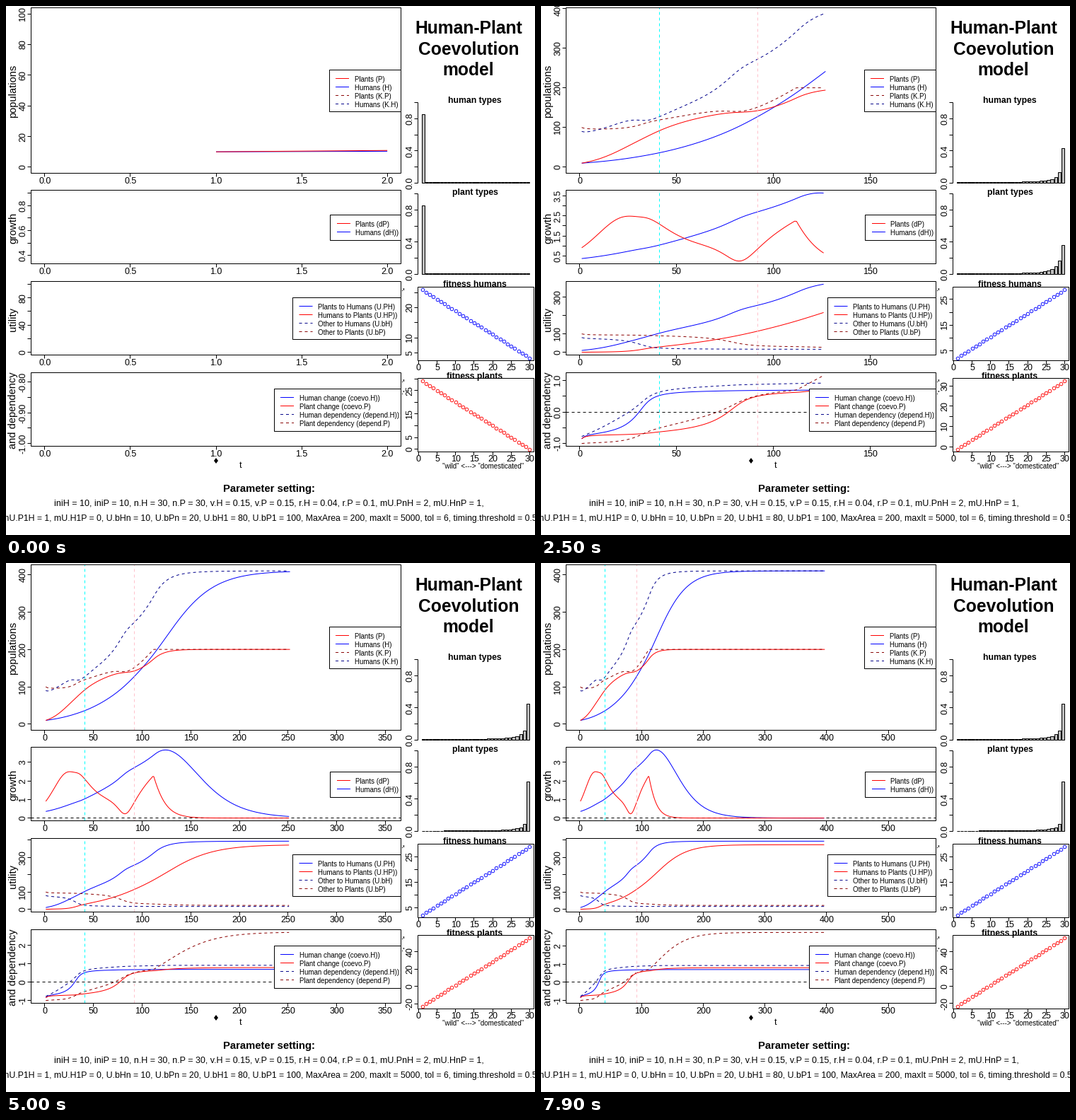
Animation of 748 by 748 pixels, one loop 8000 ms. Source, as a matplotlib script:

```python
import numpy as np
import matplotlib.pyplot as plt
from matplotlib.animation import FuncAnimation
from matplotlib.patches import Rectangle

SIZE, DPI = 748, 64
PX = 72 / DPI  # points per pixel
FRAMES = 80
N_TYPES = 30
TYPE = np.arange(1, N_TYPES + 1)
RAMP = np.linspace(0, 1, N_TYPES)
PAD = 0.04
DARK_RED, DARK_BLUE = "#8b0000", "#00008b"

plt.rcParams["font.family"] = "Liberation Sans"
plt.rcParams["path.snap"] = False  # straight rules are aligned by crisp()


# ---- model ----
def fitness(share):
    return (N_TYPES - TYPE) * (1 - share) + TYPE * share


def simulate(steps):
    """Coevolution of humans and plants, one record per step."""
    H = P = 10.0
    mix_h = np.eye(N_TYPES)[0]
    mix_p = mix_h.copy()
    log = []
    for _ in range(steps):
        u_ph, u_hp = P * (1 + RAMP @ mix_p), H * (RAMP @ mix_h)
        u_bh, u_bp = 80 - 70 * RAMP @ mix_h, 100 - 80 * RAMP @ mix_p
        k_h, k_p = u_ph + u_bh, min(u_hp + u_bp, 200)
        var_h, var_p = (0.85 * m + 0.15 / N_TYPES for m in (mix_h, mix_p))
        fit_h, fit_p = fitness(u_ph / k_h), fitness(u_hp / k_p)
        d_h, d_p = 0.04 * H * (1 - H / k_h), 0.1 * P * (1 - P / k_p)
        log.append(dict(
            P=P, H=H, KP=k_p, KH=k_h, dP=d_p, dH=d_h,
            UPH=u_ph, UHP=u_hp, UbH=u_bh, UbP=u_bp,
            cH=var_h @ (2 * RAMP - 1), cP=var_p @ (2 * RAMP - 1),
            depH=2 * u_ph / k_h - 1, depP=2 * u_hp / k_p - 1,
            varH=var_h, varP=var_p, fitH=fit_h, fitP=fit_p))
        mix_h = var_h * fit_h / (var_h @ fit_h)
        mix_p = var_p * fit_p / (var_p @ fit_p)
        H, P = H + d_h, P + d_p
    return {key: np.array([row[key] for row in log]) for key in log[0]}


DATA = simulate(5 * FRAMES + 2)

# ---- stage in pixel coordinates ----
fig = plt.figure(figsize=(SIZE / DPI, SIZE / DPI), dpi=DPI, facecolor="white")
ax = fig.add_axes([0, 0, 1, 1])
ax.set_xlim(0, SIZE)
ax.set_ylim(SIZE, 0)
ax.axis("off")
moving = []


def crisp(v):
    """Centre of the pixel that holds v."""
    return np.floor(v) + 0.5


def line(x, y, color="black", dash=False, z=3):
    style = {"dashes": (4, 4)} if dash else {}
    return ax.plot(x, y, color=color, lw=PX, zorder=z, solid_capstyle="butt", **style)[0]


def rule(x, y, *args, **kw):
    return line(crisp(x), crisp(y), *args, **kw)


def text(x, y, s, size=12.5, ha="center", **kw):
    return ax.text(x, y, s, fontsize=size * PX, ha=ha, va="baseline",
                   rotation_mode="anchor", zorder=7, **kw)


def frame_box(x0, y0, x1, y1, face="none", z=4):
    ax.add_patch(Rectangle((x0, y0), x1 - x0, y1 - y0, facecolor=face,
                           edgecolor="black", lw=PX, zorder=z))


def pretty(lo, hi, n=5):
    """Round tick positions inside lo..hi, and their labels."""
    cell = (hi - lo) / n
    base = 10.0 ** np.floor(np.log10(cell))
    unit = base
    for mult, bias in ((2, 0.8), (5, 1.7), (10, 0.8)):
        if mult * base - cell < bias * (cell - unit):
            unit = mult * base
        else:
            break
    first, last = np.ceil(lo / unit - 1e-7), np.floor(hi / unit + 1e-7)
    places = max(0, -int(np.floor(np.log10(unit) + 1e-9)))
    steps = np.arange(int(first), int(last) + 1)
    return [(i * unit, f"{i * unit:.{places}f}") for i in steps]


def label_width(s):
    return sum({".": 3, "-": 4}.get(c, 7) for c in s)


class Scale:
    """Maps a padded data range to pixels."""

    def __init__(self, lo, hi, a, b):
        pad = PAD * (hi - lo)
        self.lo, self.hi, self.a, self.b = lo - pad, hi + pad, a, b

    def __call__(self, v):
        return self.a + (np.asarray(v) - self.lo) / (self.hi - self.lo) * (self.b - self.a)

    def ticks(self):
        return [(float(self(v)), s) for v, s in pretty(self.lo, self.hi)]


def y_axis(ticks, x):
    out, end = [], -1e9
    for y, s in ticks:
        out.append(rule([x - 5.5, x], [y, y]))
        half = label_width(s) / 2
        if -y - half - end >= 9.35:
            out.append(text(x - 8, y, s, rotation=90))
            end = -y + half
    return out


def x_axis(ticks, y, base):
    out = []
    for x, s in ticks:
        out += [rule([x, x], [y, y + 5]), text(x, base, s)]
    return out


# ---- left panels: top, bottom, lower limit, zero line, curves ----
LEFT, RIGHT = 35.5, 558.5
PANELS = [
    (2.5, 236.5, 0, False, [("H", "blue", 0), ("P", "red", 0),
                            ("KP", DARK_RED, 1), ("KH", DARK_BLUE, 1)]),
    (260.5, 364.5, None, True, [("dH", "blue", 0), ("dP", "red", 0)]),
    (389.5, 493.5, 0, False, [("UPH", "blue", 0), ("UHP", "red", 0),
                              ("UbH", DARK_BLUE, 1), ("UbP", DARK_RED, 1)]),
    (518.5, 622.5, None, True, [("cH", "blue", 0), ("cP", "red", 0),
                                ("depH", DARK_BLUE, 1), ("depP", DARK_RED, 1)]),
]
Y_TITLES = ["populations", "growth", "utility", "and dependency"]
MARKS = [(41, "cyan"), (92, "pink")]

# box left, top, bottom, sample x, text x, first row, entries
LEGENDS = [
    (457.5, 90.5, 149.5, 466, 493, 103, [
        ("Plants (P)", "red", 0), ("Humans (H)", "blue", 0),
        ("Plants (K.P)", DARK_RED, 1), ("Humans (K.H)", DARK_BLUE, 1)]),
    (458.5, 295.5, 331.5, 468, 494, 308, [
        ("Plants (dP)", "red", 0), ("Humans (dH))", "blue", 0)]),
    (405.5, 412.5, 471.5, 414.5, 441, 425, [
        ("Plants to Humans (U.PH)", "blue", 0), ("Humans to Plants (U.HP))", "red", 0),
        ("Other to Humans (U.bH)", DARK_BLUE, 1), ("Other to Plants (U.bP)", DARK_RED, 1)]),
    (379.5, 541.5, 601.5, 388, 415, 554, [
        ("Human change (coevo.H))", "blue", 0), ("Plant change (coevo.P)", "red", 0),
        ("Human dependency (depend.H))", DARK_BLUE, 1),
        ("Plant dependency (depend.P)", DARK_RED, 1)]),
]

# ---- right panels ----
R_LEFT, R_RIGHT = 582.5, 746.5
TYPE_X = Scale(1, N_TYPES, R_LEFT, R_RIGHT)
BARS = [("varH", 250.5), ("varP", 379.5)]
FITS = [("fitH", 397.5, 501.5, "blue"), ("fitP", 526.5, 630.5, "red")]
BAR_H = 114
BAR_UNIT = (R_RIGHT - R_LEFT) / 1.08 / 35.8
BAR_X = R_LEFT + (R_RIGHT - R_LEFT) * PAD / 1.08 + BAR_UNIT * 1.2 * np.arange(N_TYPES)


def draw_static():
    for (top, bottom, *_), title in zip(PANELS, Y_TITLES):
        frame_box(LEFT, top, RIGHT, bottom)
        text(14, (top + bottom) / 2 + 1, title, 14.6, rotation=90)
    for x, top, bottom, sx, tx, y, rows in LEGENDS:
        frame_box(x, top, RIGHT, bottom, "white", 5)
        for i, (s, color, dash) in enumerate(rows):
            row = y + 12 * i
            line([sx, sx + 19], [row - 0.5] * 2, color, dash, z=6)
            text(tx, row + 3.5, s, 9.7, "left")

    for i, s in enumerate(("Human-Plant", "Coevolution", "model")):
        text(654, 39 + 29.6 * i, s, 24.6, weight="bold")
    for y, s in ((137, "human types"), (267, "plant types"),
                 (397, "fitness humans"), (526.5, "fitness plants")):
        text(663, y, s, 12.2, weight="bold")

    for _, base in BARS:
        line([R_LEFT] * 2, [base, base - BAR_H])
        y_axis([(base - BAR_H * v / 10, f"{v / 10:.1f}") for v in range(0, 11, 2)], R_LEFT)
    for _, top, bottom, _ in FITS:
        frame_box(R_LEFT, top, R_RIGHT, bottom)
        x_axis(TYPE_X.ticks(), bottom, bottom + 13.5)

    text(332, 653, "t")
    text(675, 653.5, '"wild" <---> "domesticated"', 9.8)
    ax.plot([297], [643], "d", color="black", ms=6 * PX, mew=0)
    # stray tips of cropped axis titles
    for x, y, h in ((562.5, 399, 3), (560.5, 402, 1), (562.5, 528, 3),
                    (560.5, 531, 1), (562.5, 544, 2), (560.5, 548, 1)):
        line([x, x], [y, y + h])

    text(372.5, 687, "Parameter setting:", 14.9, weight="bold")
    text(371.5, 707, "iniH = 10, iniP = 10, n.H = 30, n.P = 30, v.H = 0.15, v.P = 0.15, "
         "r.H = 0.04, r.P = 0.1, mU.PnH = 2, mU.HnP = 1,", 12.5)
    text(372, 728, "mU.P1H = 1, mU.H1P = 0, U.bHn = 10, U.bPn = 20, U.bH1 = 80, "
         "U.bP1 = 100, MaxArea = 200, maxIt = 5000, tol = 6, timing.threshold = 0.5", 12.25)


def draw_panel(panel, now, sx):
    top, bottom, low, zero, curves = panel
    series = [DATA[key][:now + (key in "PH")] for key, *_ in curves]
    hi = max(s.max() for s in series)
    lo = min(s.min() for s in series) if low is None else low
    sy = Scale(lo, hi, bottom, top)
    out = []
    for s, (_, color, dash) in zip(series, curves):
        if len(s) > 1:
            out.append(line(sx(np.arange(1, len(s) + 1)), sy(s), color, dash))
    if zero and sy.lo < 0 < sy.hi:
        out.append(rule([LEFT, RIGHT], [sy(0)] * 2, dash=True, z=2))
    for t, color in MARKS:
        if now >= t:
            out.append(rule([sx(t)] * 2, [bottom, top], color, True))
    out += y_axis(sy.ticks(), LEFT)
    out += x_axis(sx.ticks(), bottom, bottom + 14.5)
    return out


def draw_bars(share, base):
    left, right = crisp(BAR_X), crisp(BAR_X + BAR_UNIT)
    return ax.bar(left, crisp(base - BAR_H * share) - base, right - left, bottom=base,
                  align="edge", color="#bebebe", edgecolor="black", lw=PX, zorder=3)


def update(k):
    while moving:
        moving.pop().remove()
    now = 1 + 5 * k
    sx = Scale(0, np.ceil(1.4 * now), LEFT, RIGHT)
    for panel in PANELS:
        moving.extend(draw_panel(panel, now, sx))
    for key, base in BARS:
        moving.append(draw_bars(DATA[key][now - 1], base))
    for key, top, bottom, color in FITS:
        fit = DATA[key][now - 1]
        sy = Scale(fit.min(), fit.max(), bottom, top)
        moving.extend(ax.plot(TYPE_X(TYPE), sy(fit), "o", mfc="none", mec=color,
                              ms=4.6 * PX, mew=0.9 * PX, zorder=3))
        moving.extend(y_axis(sy.ticks(), R_LEFT))
    return []


draw_static()
anim = FuncAnimation(fig, update, frames=FRAMES, interval=100, repeat=True,
                     repeat_delay=0, blit=False)
plt.show()
```
